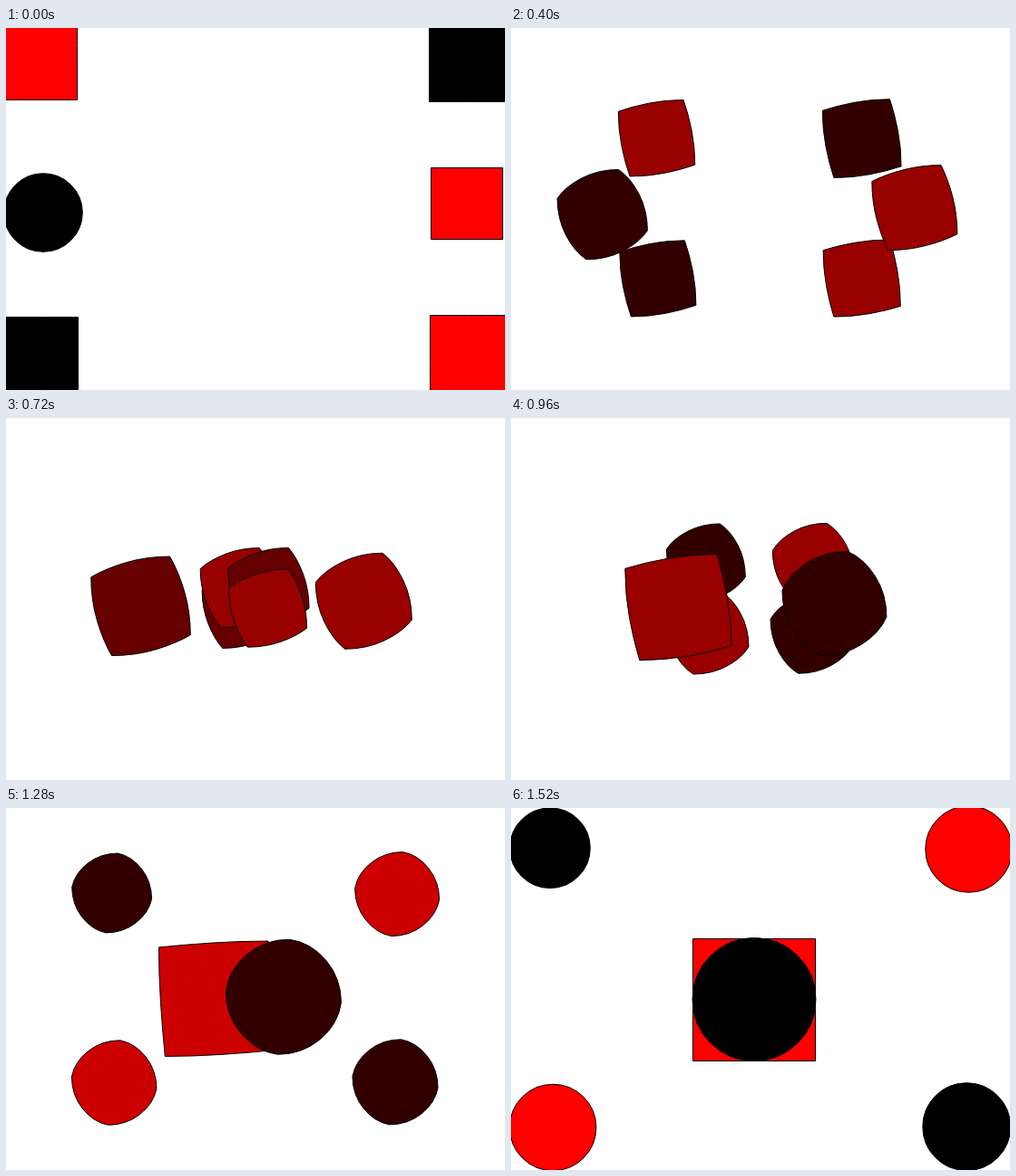
An HTML page with a canvas for the animation above (1.6 s loop, 550x400 px).

```html
<!DOCTYPE html>
<html lang="en">
<head>
<meta charset="utf-8">
<title>Shape morph</title>
<style>
  html, body { margin: 0; width: 100%; height: 100%; overflow: hidden; background: #fff; }
  canvas { display: block; }
</style>
</head>
<body>
<canvas id="stage" width="550" height="400"></canvas>
<script>
const ctx = document.getElementById('stage').getContext('2d');
const STEP = 80, STEPS = 20;

// Back to front. square: [left, top, side], circle: [cx, cy, radius].
const shapes = [
  { square: [-0.5, 319.5, 80], circle: [504.5, 45.5, 47.7], red: [0, 1] },
  { square: [-1.5, -0.6, 80], circle: [502.2, 352.2, 48.4], red: [1, 0] },
  { square: [466.5, -2.2, 83.6], circle: [46.2, 353, 47.7], red: [0, 1] },
  { square: [467.5, 317.5, 83.9], circle: [43, 44.2, 44.3], red: [1, 0] },
  { square: [200.5, 144.5, 135], circle: [41, 204, 43.3], red: [0, 1], toSquare: true },
  { square: [468.5, 154.5, 79], circle: [268, 211.5, 68], red: [1, 0] },
];

const mix = (a, b, p) => a + (b - a) * p;

// 16 points clockwise from the top-left corner; odd ones are curve controls.
function squarePoint([x, y, side], i) {
  const along = (i % 4) / 4;
  const [u, v] = [[along, 0], [1, along], [1 - along, 1], [0, 1 - along]][i >> 2];
  return [x + u * side, y + v * side];
}

// The matching 16 points of a circle, clockwise from its leftmost point.
function circlePoint([cx, cy, r], i) {
  const angle = Math.PI + i * Math.PI / 8;
  const d = i % 2 ? r / Math.cos(Math.PI / 8) : r;
  return [cx + d * Math.cos(angle), cy + d * Math.sin(angle)];
}

// Colours fall on a coarse palette with steps of 51.
function paletteRed(level) {
  const v = Math.round(level * 255);
  return v === 255 ? v : Math.round((v & 224) / 51) * 51;
}

function drawShape({ square, circle, red, toSquare }, p) {
  const roundness = toSquare ? 1 - p : p;
  const point = i => {
    const [sx, sy] = squarePoint(square, i % 16);
    const [cx, cy] = circlePoint(circle, i % 16);
    return [mix(sx, cx, roundness), mix(sy, cy, roundness)];
  };
  ctx.beginPath();
  ctx.moveTo(...point(0));
  for (let i = 1; i < 16; i += 2) ctx.quadraticCurveTo(...point(i), ...point(i + 1));
  ctx.closePath();
  ctx.fillStyle = `rgb(${paletteRed(mix(red[0], red[1], p))}, 0, 0)`;
  ctx.fill();
  ctx.stroke();
}

function draw(now) {
  const p = Math.floor(now / STEP) % STEPS / (STEPS - 1);
  ctx.fillStyle = '#fff';
  ctx.fillRect(0, 0, 550, 400);
  for (const shape of shapes) drawShape(shape, p);
}

const start = performance.now();
function tick() {
  draw(performance.now() - start);
  requestAnimationFrame(tick);
}
tick();
</script>
</body>
</html>
```
